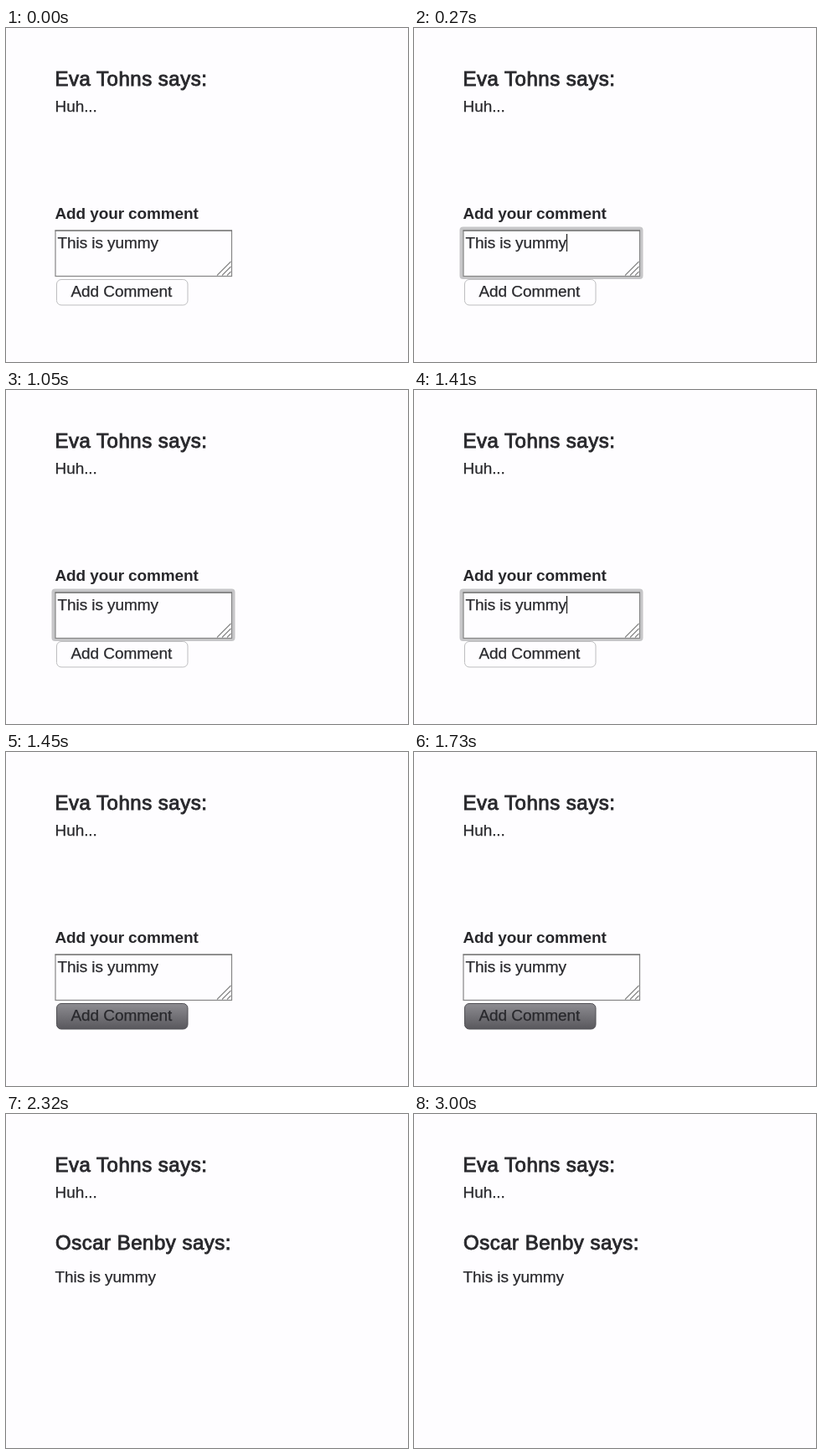
These frames come from a looping animation (480 px wide and 399 px high, 3.05 s). An HTML page:

```html
<!DOCTYPE html>
<html lang="en">
<head>
<meta charset="utf-8">
<title>Comment form</title>
<style>
  html, body { margin: 0; width: 100%; height: 100%; overflow: hidden; background: #fefdff; }
  svg { display: block; width: 480px; height: 399px; }
  text {
    font: 19px "Liberation Sans", Arial, sans-serif; letter-spacing: -.07px;
    fill: #28282c; stroke: #28282c; stroke-width: .25px;
  }
  .head { font-size: 24px; letter-spacing: .5px; stroke-width: .9px; }
  .label { font-weight: bold; letter-spacing: -.12px; stroke: none; }
  .handle { stroke: #858585; stroke-width: 1.1; }
</style>
</head>
<body>
<svg viewBox="0 0 480 399">
  <defs>
    <linearGradient id="dark" x2="0" y2="1">
      <stop stop-color="#8d8c91"/>
      <stop offset="1" stop-color="#59585d"/>
    </linearGradient>
  </defs>

  <text class="head" x="58.5" y="69">Eva Tohns says:</text>
  <text x="58.5" y="100">Huh...</text>

  <g id="form">
    <text class="label" x="58.5" y="228">Add your comment</text>
    <rect id="ring" x="54.5" y="237.5" width="219" height="62.5" rx="4" fill="#c6c6c8"/>
    <rect x="59" y="242" width="210.5" height="54.5" fill="#fefdff" stroke="#858585" stroke-width="1.2"/>
    <path d="M58.5 242h211.5" stroke="#686868"/>
    <path class="handle" d="M252 295.5l16.5-16.5M258 295.5l10.5-10.5M264 295.5l4.5-4.5"/>
    <text x="61.5" y="262.5">This is yummy</text>
    <path id="caret" d="M182.5 246v21" stroke="#222" stroke-width="1.3"/>
    <rect id="button" x="60.5" y="300.5" width="156.5" height="30.5" rx="5.5"/>
    <text x="77.5" y="321">Add Comment</text>
  </g>

  <g id="reply">
    <text class="head" x="59" y="162">Oscar Benby says:</text>
    <text x="58.5" y="200.5">This is yummy</text>
  </g>
</svg>
<script>
  const LOOP = 3050, FOCUS = 230, BLINK = 530, PRESS = 1420, POST = 1740;
  const $ = id => document.getElementById(id);
  const show = (id, on) => $(id).setAttribute("visibility", on ? "inherit" : "hidden");

  function draw(now) {
    const t = now % LOOP;
    const focused = t >= FOCUS && t < PRESS;
    const pressed = t >= PRESS;

    show("form", t < POST);
    show("reply", t >= POST);
    show("ring", focused);
    show("caret", focused && Math.floor((t - FOCUS) / BLINK) % 2 === 0);
    $("button").setAttribute("fill", pressed ? "url(#dark)" : "#fefdff");
    $("button").setAttribute("stroke", pressed ? "#515055" : "#bdbdbf");
    requestAnimationFrame(draw);
  }
  draw(performance.now());
</script>
</body>
</html>
```
